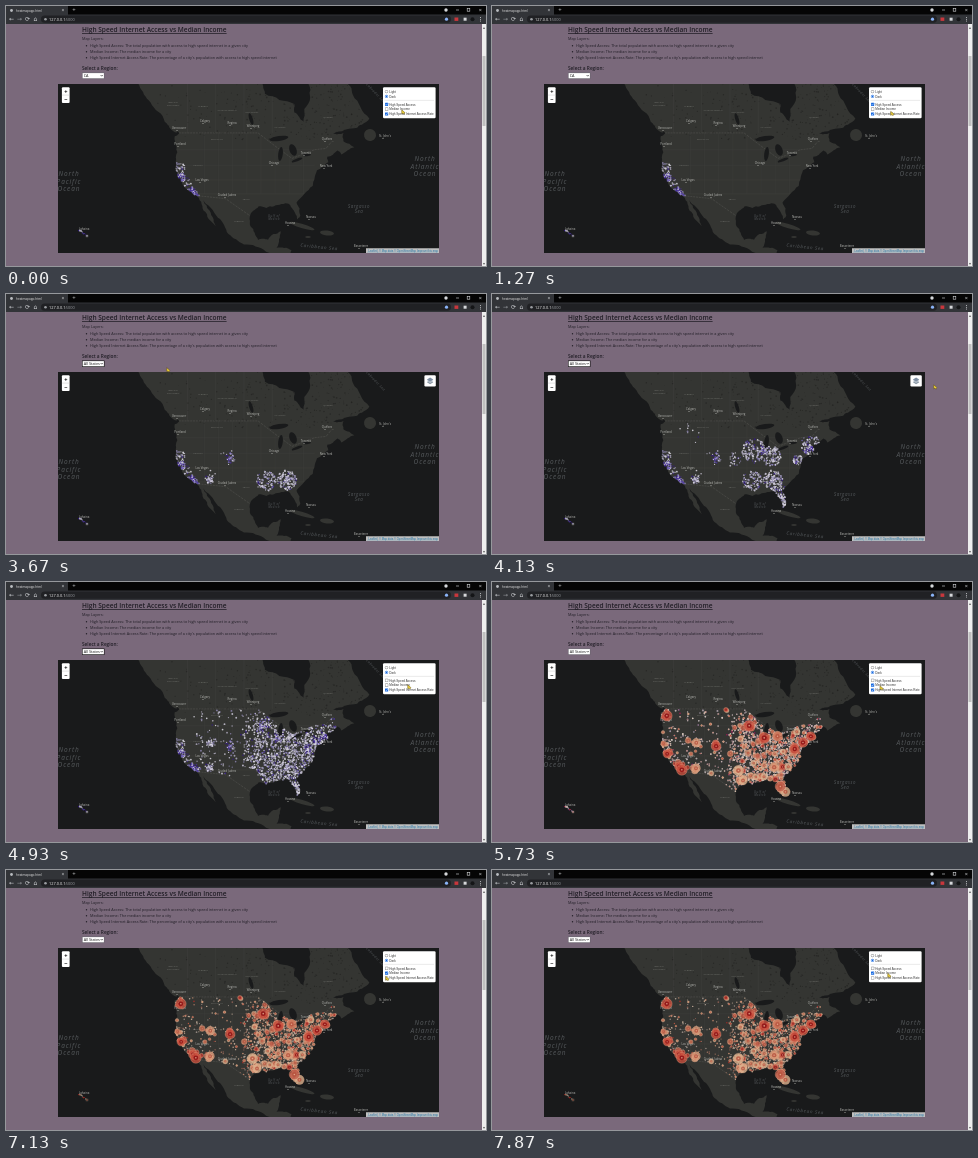
An HTML page with a canvas for the animation above (8000 ms loop, 480 by 260 pixels).

```html
<!DOCTYPE html>
<html lang="en">
<head>
<meta charset="utf-8">
<title>High Speed Internet Access</title>
<style>
html, body { margin: 0; width: 100%; height: 100%; overflow: hidden; background: #7a697b; }
canvas { display: block; width: 480px; height: 260px; }
</style>
</head>
<body>
<canvas id="stage" width="480" height="260"></canvas>
<script>
const W = 480, H = 260, LOOP = 8000;
const SANS = '"Open Sans", "Noto Sans", sans-serif';
const ARIAL = '"Liberation Sans", Arial, sans-serif';
const SYMBOL = '"DejaVu Sans", sans-serif';
const stage = document.getElementById('stage').getContext('2d');

let seed = 20417;
function rand() {
  seed = (seed + 0x6D2B79F5) | 0;
  let z = Math.imul(seed ^ (seed >>> 15), 1 | seed);
  z = (z + Math.imul(z ^ (z >>> 7), 61 | z)) ^ z;
  return ((z ^ (z >>> 14)) >>> 0) / 4294967296;
}
const gauss = () => rand() + rand() + rand() - 1.5;
const pick = list => list[Math.floor(rand() * list.length)];
const clamp = (v, a = 0, b = 1) => Math.min(b, Math.max(a, v));

// Drawing helpers
function disc(c, x, y, r, fill) {
  c.fillStyle = fill;
  c.beginPath();
  c.arc(x, y, r, 0, 7);
  c.fill();
}
function box(c, x, y, w, h, fill, round = 0) {
  c.fillStyle = fill;
  c.beginPath();
  c.roundRect(x, y, w, h, round);
  c.fill();
}
function line(c, x1, y1, x2, y2, color, width) {
  c.strokeStyle = color;
  c.lineWidth = width;
  c.beginPath();
  c.moveTo(x1, y1);
  c.lineTo(x2, y2);
  c.stroke();
}
function text(c, s, x, y, font, color, align = 'left') {
  c.font = font;
  c.fillStyle = color;
  c.textAlign = align;
  c.fillText(s, x, y);
}
function layer(draw) {
  const el = document.createElement('canvas');
  el.width = W;
  el.height = H;
  draw(el.getContext('2d'));
  return el;
}
function clipMap(c) {
  c.beginPath();
  c.rect(52, 78, 381, 169);
  c.clip();
}

// Web Mercator
const merc = lat => Math.log(Math.tan(Math.PI / 4 + lat * Math.PI / 360)) * 180 / Math.PI;
const px = lon => 294 + (lon + 80.2) * 2.83;
const py = lat => 211.5 - (merc(lat) - 26.7) * 2.85;

// Closed outline, roughened by midpoint displacement
function ragged(coords, rounds) {
  let pts = [];
  for (let i = 0; i < coords.length; i += 2) pts.push([px(coords[i]), py(coords[i + 1])]);
  while (rounds--) {
    pts = pts.flatMap(([x, y], i) => {
      const [u, v] = pts[(i + 1) % pts.length], k = (rand() - .5) * .24;
      return [[x, y], [(x + u) / 2 + (v - y) * k, (y + v) / 2 - (u - x) * k]];
    });
  }
  const p = new Path2D();
  for (const [x, y] of pts) p.lineTo(x, y);
  p.closePath();
  return p;
}
// Each blob: x, y, half width, half height, turn
function blobs(list) {
  const all = new Path2D();
  for (const b of list) {
    const p = new Path2D();
    p.ellipse(...b, 0, 7);
    all.addPath(p);
  }
  return all;
}

const mainland = ragged([-141,60, -137,58.8, -133,55.5, -128,51.5, -122.8,49, -124.5,48.2, -124.1,43,
  -124.2,40.4, -122.3,37, -120.6,34.6, -117.2,32.6, -114.3,28, -110,23, -112.8,28.5, -114.7,31.6,
  -109.2,25.7, -105.5,20.5, -100,17, -92.2,14.5, -84,12, -83.2,15, -88.5,15.9, -87,21.4, -91.5,18.6,
  -95,18.5, -97.7,23, -97.2,27.5, -94.8,29.3, -89.4,29.3, -84,30, -82.7,28.3, -81.2,25.2, -80.1,26.5,
  -81.4,30.5, -75.7,35.3, -74.2,39.7, -70.2,41.8, -70.6,43.2, -67,44.8, -65.5,43.8, -61,45.6,
  -64.8,47, -64.8,49, -68.5,48.8, -60,50.2, -55.7,52.2, -61.5,57, -64,60, -77.8,60, -76.6,56.5,
  -79,51.5, -82.2,53.5, -82.2,55.2, -92.6,57.2, -94.5,60], 3);
const islands = blobs([[364,129,6,6,.5], [167,123,5,1.5,.7], [296,220,13,2,.3], [321,227,7,2.4,.1],
  [302,231,2.8,1,0], [81,230,1.8,1.8,0]]);
const lakes = blobs([[273,132.5,9.5,2.5,-.15], [274.5,148,2.3,7,.12], [287,144,3.5,6,-.35],
  [291,154,5.6,1.4,-.35], [301,149,4,1.2,-.1], [245,113,1.8,6,-.3]]);

// Piecewise linear: alternating x, y keys
function trace(x, ...keys) {
  let i = 2;
  while (i < keys.length - 2 && keys[i] < x) i += 2;
  const u = clamp((x - keys[i - 2]) / (keys[i] - keys[i - 2]));
  return keys[i - 1] + (keys[i + 1] - keys[i - 1]) * u;
}
const northEdge = lon => trace(lon, -95, 49, -83, 42.8, -75, 45, -71, 45.3, -69, 47);
const southEdge = lon => trace(lon, -117, 32.5, -106.5, 31.6, -97.3, 26, -96, 24);
const inUsa = (lon, lat) => lat < northEdge(lon) && lat > southEdge(lon) && lon < -67.5
  && stage.isPointInPath(mainland, px(lon), py(lat)) && !stage.isPointInPath(lakes, px(lon), py(lat));
const inCalifornia = (lon, lat) => lat < 41.7 && lon < -120.8 + Math.max(0, 39 - lat) * .78;

// Regions in the order they load: x, y, radius
const early = [[281,186,10], [260,187,10], [207,183,8], [222,163,8], [319,151,10], [291,207,15],
  [197,140,11], [262,157,12], [279,162,10], [241,166,8], [306,166,5]];
const FIRST = early.length, ALL = FIRST + 20;
function loadOrder(lon, lat) {
  if (inCalifornia(lon, lat)) return 1;
  if (lon < -150) return 4;
  const i = early.findIndex(([x, y, r]) => Math.hypot(px(lon) - x, py(lat) - y) < r);
  if (i >= 0) return i;
  const texas = lat < 33.5 && lon > -104 && lon < -94, northwest = lon < -117;
  if (texas || northwest) return ALL - 1;
  return FIRST + 1 + Math.abs(Math.floor(lon / 4) * 7 + Math.floor(lat / 3) * 5) % 14;
}

const whites = ['#e9e6f0', '#d3cfe0', '#b5b0c6', '#9088b4'];
const purples = ['#7a6cc0', '#4b35a0', '#33198a', '#d9d4ec'];
const tans = ['#c9b8aa', '#d9b79b', '#a89a92', '#cf8f72', '#e2c6ae', '#9b6558'];
const reds = ['#e0a080', '#cf5f47', '#b52a24', '#e8c3a5'];
const dots = [], circles = [];

function addDot(lon, lat, rich) {
  const near = rich && rand() < .75;
  dots.push({
    x: px(lon), y: py(lat), ca: inCalifornia(lon, lat), order: loadOrder(lon, lat),
    blue: pick(near ? purples : whites), red: pick(near ? reds : tans), r: .5 + rand() * .38
  });
}
function addCircle(lon, lat, r, rich) {
  circles.push({ x: px(lon), y: py(lat), r, ca: inCalifornia(lon, lat),
    fill: rich ? '#c9503e' : pick(['#d99a78', '#d07a5e', '#dcb08c', '#bf5b48']),
    core: rich ? '#8a0c12' : '#b5523f' });
}

// Scattered towns, thinning out westwards
for (let i = 0; i < 5200; i++) {
  const lon = -124.5 + rand() * 57, lat = 25 + rand() * 24;
  if (!inUsa(lon, lat)) continue;
  const east = clamp((lon + 101) / 6);
  const chance = inCalifornia(lon, lat) ? .6 : .09 + .85 * east * clamp((50 - lat) / 6);
  if (rand() > chance) continue;
  addDot(lon, lat, rand() < .2);
  if (rand() < .15) addCircle(lon, lat, .9 + 2.6 * rand() ** 3, rand() < .15);
}
// Big cities: the first ones are the richer
const hubs = [[-122.2,37.6], [-118,34], [-117,33], [-122.3,47.4], [-104.9,39.7], [-87.9,41.9], [-93.2,45],
  [-74.2,40.7], [-77.1,38.9], [-71.4,42.3], [-112,33.5], [-97,32.8], [-95.4,29.8], [-84.4,33.8],
  [-82.2,28], [-80.4,26.3], [-83.2,42.3], [-111.9,40.6]];
hubs.forEach(([lon, lat], i) => {
  const rich = i < 10;
  for (let k = 0; k < 34; k++) {
    const a = lon + gauss() * 1.5, b = lat + gauss() * 1.1;
    if (inUsa(a, b)) addDot(a, b, rich);
  }
  for (let k = 0; k < 3; k++) addCircle(lon + gauss() * 1.6, lat + gauss(), 1.4 + rand() * 1.8, rich);
  addCircle(lon, lat, 4.2 + rand() * 1.4, rich);
});
for (let i = 0; i < 8; i++) addDot(-158.4 + i * .42, 21.7 - i * .27 + gauss() * .3, true);
circles.sort((a, b) => a.r - b.r);

function drawBlue(c, keep) {
  c.globalAlpha = .8;
  for (const d of dots) if (keep(d)) disc(c, d.x, d.y, d.r + .1, d.blue);
  c.globalAlpha = 1;
}
function drawRed(c, keep) {
  c.globalAlpha = .8;
  for (const d of dots) if (keep(d)) disc(c, d.x, d.y, d.r, d.red);
  for (const o of circles.filter(keep)) {
    disc(c, o.x, o.y, o.r, o.fill);
    c.strokeStyle = '#e9b595';
    c.lineWidth = .35;
    c.stroke();
    disc(c, o.x, o.y, o.r * .45, o.core);
    disc(c, o.x, o.y, o.r * .15, '#e9b595');
  }
  c.globalAlpha = 1;
}

function drawChrome(c) {
  const pale = '#d5d7da', dim = '#9a9da1';
  box(c, 0, 0, W, 9, '#050505');
  box(c, 0, 0, 62, 9, '#323438');
  box(c, 0, 8.5, W, 9.5, '#323438');
  box(c, 35, 9.6, 410, 7.2, '#202124', 3.6);
  disc(c, 5.5, 4.5, 1.4, '#b9bcc0');
  text(c, 'heatmapapp.html', 10, 5.7, '3.1px ' + SANS, '#e4e4e4');
  text(c, '×', 57, 6, '5px ' + SANS, pale, 'center');
  text(c, '+', 68, 6.2, '6px ' + SANS, pale, 'center');
  text(c, '←', 5.5, 15, '6px ' + SYMBOL, pale, 'center');
  text(c, '→', 13.5, 15, '6px ' + SYMBOL, dim, 'center');
  text(c, '⟳', 21.5, 15, '6px ' + SYMBOL, pale, 'center');
  text(c, '⌂', 29.5, 15, '6px ' + SYMBOL, pale, 'center');
  disc(c, 39.5, 13.2, 1.3, dim);
  text(c, '127.0.0.1', 43, 14.6, '3.9px ' + SANS, '#f1f1f1');
  text(c, ':5000', 58.8, 14.6, '3.9px ' + SANS, dim);
  disc(c, 440.5, 13.2, 1.6, '#8ab4f8');
  box(c, 448.5, 11.5, 3.8, 3.4, '#c9373c');
  box(c, 457.6, 11.7, 3, 3, pale);
  disc(c, 466.5, 13.2, 2, '#141517');
  for (let i = -1; i < 2; i++) disc(c, 474.5, 13.2 + i * 1.7, .5, pale);
  disc(c, 440, 4, 1.7, pale);
  line(c, 450, 4, 453, 4, pale, .6);
  c.strokeRect(461.2, 2.6, 2.6, 2.6);
  text(c, '×', 474.2, 5.9, '5.5px ' + SANS, pale, 'center');
}

function drawPage(c) {
  const ink = '#211e26', body = '3.83px ' + SANS;
  box(c, 0, 18, W, H - 18, '#7a697b');
  box(c, 476, 18, 4, H - 18, '#eeeeee');
  box(c, 476.5, 50, 3, 70, '#bfbfbf');
  text(c, '▴', 478, 22.5, '4px ' + SYMBOL, '#555', 'center');
  text(c, '▾', 478, 258.5, '4px ' + SYMBOL, '#555', 'center');
  const title = 'High Speed Internet Access vs Median Income';
  text(c, title, 76, 26.3, '600 6.55px ' + SANS, ink);
  box(c, 76, 27.1, c.measureText(title).width, .6, ink);
  text(c, 'Map Layers:', 76, 34.3, body, ink);
  ['High Speed Access: The total population with access to high speed internet in a given city',
    'Median Income: The median income for a city',
    "High Speed Internet Access Rate: The percentage of a city's population with access to high speed internet"
  ].forEach((s, i) => {
    disc(c, 80.5, 39.8 + i * 6, .7, ink);
    text(c, s, 84, 41.1 + i * 6, body, ink);
  });
  text(c, 'Select a Region:', 76, 63.6, '600 4.75px ' + SANS, ink);
}

function drawLand(c) {
  box(c, 52, 78, 381, 169, '#191a1b');
  c.fillStyle = '#343532';
  c.fill(mainland);
  c.fill(islands);
  c.save();
  c.clip(mainland);
  // Small northern lakes
  c.globalAlpha = .6;
  for (let i = 0; i < 420; i++) {
    const x = 150 + rand() * 210, y = 78 + rand() * 56;
    if (rand() < (x - 110) / 200) disc(c, x, y, .3 + rand() * .6, '#20211f');
  }
  c.globalAlpha = 1;
  // Province and state lines
  for (let lon = -120; lon < -88; lon += 10) line(c, px(lon), py(60), px(lon), py(49), '#454642', .4);
  for (let lat = 33; lat < 49; lat += 4) line(c, px(-124), py(lat), px(-75), py(lat), '#40413d', .4);
  for (let lon = -114; lon < -78; lon += 5) line(c, px(lon), py(northEdge(lon)), px(lon), py(33), '#40413d', .4);
  for (const edge of [northEdge, southEdge]) {
    for (let lon = -123; lon < -68; lon++)
      line(c, px(lon), py(edge(lon)), px(lon + .7), py(edge(lon + .7)), '#565753', .5);
  }
  c.restore();
  c.fillStyle = '#191a1b';
  c.fill(lakes);
}

function seaText(c, s, x, y, size, turn = 0) {
  c.save();
  c.translate(x, y);
  c.rotate(turn);
  c.letterSpacing = size * .14 + 'px';
  s.split('|').forEach((part, i) => text(c, part, 0, i * size * 1.16, `italic ${size}px ${SANS}`, '#565a5d', 'center'));
  c.restore();
}

function drawLabels(c) {
  for (const [s, x, y] of [['BRITISH', 167, 97], ['COLUMBIA', 167, 100], ['ALBERTA', 197, 101],
    ['SASKATCHEWAN', 221, 105], ['MANITOBA', 246, 107], ['ONTARIO', 274, 122], ['QUEBEC', 322, 112],
    ['MONTANA', 211, 134], ['NEVADA', 192, 160], ['TEXAS', 240, 194], ['MEXICO', 233, 216]])
    text(c, s, x, y, '2.5px ' + SANS, '#747570', 'center');
  for (const [s, x, y] of [['Vancouver', 173, 123], ['Calgary', 199, 116], ['Regina', 226, 118],
    ['Winnipeg', 247, 121], ['Portland', 174, 139], ['Las Vegas', 196, 175], ['Ciudad Juárez', 221, 190],
    ['Chicago', 268, 158], ['Toronto', 300, 148], ['Québec', 321, 134], ['New York', 320, 161],
    ["St. John's", 379, 131], ['Havana', 284, 218], ['Nassau', 305, 212], ['Lahaina', 78, 224],
    ['Basseterre', 355, 241]]) {
    text(c, s, x, y, '2.9px ' + SANS, '#b5b6b2', 'center');
    disc(c, x - 2, y + 1.5, .5, '#c4c4c0');
  }
  seaText(c, 'North|Pacific|Ocean', 63, 170.3, 6.5);
  seaText(c, 'North|Atlantic|Ocean', 419, 155.3, 6.5);
  seaText(c, 'Sargasso|Sea', 353, 201.7, 4.4);
  seaText(c, 'Gulf of|Mexico', 268, 211, 3);
  seaText(c, 'Labrador Sea', 369, 88, 3.4, .8);
  seaText(c, 'Caribbean Sea', 313, 242.5, 4.6, .1);
}

function drawMap(c) {
  c.save();
  clipMap(c);
  drawLand(c);
  drawLabels(c);
  c.restore();
  box(c, 360, 242.3, 73, 4.7, 'rgba(255,255,255,.72)');
  text(c, 'Leaflet | © Map data © OpenStreetMap Improve this map', 432, 245.6, '2.75px ' + ARIAL, '#2878a8', 'right');
  line(c, 361, 246.2, 432, 246.2, '#5d96b8', .3);
  box(c, 55.9, 81.2, 7.7, 15.8, '#fff', 1);
  line(c, 55.9, 89.1, 63.6, 89.1, '#bbb', .4);
  text(c, '+', 59.8, 87.2, 'bold 5.5px ' + ARIAL, '#111', 'center');
  text(c, '−', 59.8, 94.9, 'bold 5.5px ' + ARIAL, '#111', 'center');
}

function drawSelect(c, all, focus) {
  box(c, 76, 66.5, 22.5, 6.4, focus ? '#101010' : '#6b6670');
  box(c, 76.6, 67.1, 21.3, 5.2, '#fff');
  text(c, all ? 'All States' : 'CA', 77.7, 71.1, '3.8px ' + SANS, '#111');
  line(c, 94.6, 69, 95.7, 70.2, '#111', .6);
  line(c, 95.7, 70.2, 96.8, 69, '#111', .6);
}

function drawToggle(c) {
  box(c, 418.4, 81.2, 11.4, 11.2, '#fff', 1.2);
  ['#8b98a5', '#b4bec8', '#7f8fa3'].forEach((fill, i) => {
    const y = 88.2 - i * 1.3;
    c.fillStyle = fill;
    c.beginPath();
    c.moveTo(420.9, y);
    c.lineTo(424.1, y - 2);
    c.lineTo(427.3, y);
    c.lineTo(424.1, y + 2);
    c.fill();
  });
}

function drawPane(c, checks) {
  const font = '3px ' + ARIAL, accent = '#1769e0';
  box(c, 377, 81.3, 52.6, 30.9, '#fff', 1.2);
  ['Light', 'Dark'].forEach((s, i) => {
    const y = 85.6 + i * 4.8;
    disc(c, 380.5, y, 1.6, i ? accent : '#777');
    disc(c, 380.5, y, 1.2, '#fff');
    if (i) disc(c, 380.5, y, .8, accent);
    text(c, s, 383.3, y + 1.1, font, '#333');
  });
  line(c, 378.5, 94.4, 428, 94.4, '#ccc', .4);
  ['High Speed Access', 'Median Income', 'High Speed Internet Access Rate'].forEach((s, i) => {
    const y = 98.4 + i * 4.8;
    box(c, 379, y - 1.6, 3.2, 3.2, checks[i] ? accent : '#777', .4);
    if (checks[i]) {
      line(c, 379.7, y, 380.4, y + .8, '#fff', .5);
      line(c, 380.4, y + .8, 381.6, y - .8, '#fff', .5);
    } else box(c, 379.4, y - 1.2, 2.4, 2.4, '#fff');
    text(c, s, 383.3, y + 1.1, font, '#333');
  });
}

function drawCursor(c, x, y) {
  c.beginPath();
  c.moveTo(x - 1.3, y - 2.2);
  c.lineTo(x - 1.3, y + 1.9);
  c.lineTo(x, y + 1.1);
  c.lineTo(x + .9, y + 2.3);
  c.lineTo(x + 1.9, y + .6);
  c.closePath();
  c.fillStyle = '#ecd03a';
  c.fill();
  c.strokeStyle = '#4a3c08';
  c.lineWidth = .4;
  c.stroke();
}

// Pointer moves: start, end, x, y
const moves = [[270,600,364,92], [800,1000,423,94], [1130,1270,400,107.5], [1270,1470,381,99],
  [1730,2000,381,108], [2000,2530,95,81], [2600,3130,82,71], [3470,4130,443,93], [4330,4930,403,105],
  [4930,5130,381,104], [5530,6000,402,109], [6870,7070,381,108.5], [7330,7600,397,105.5]];
function pointer(t) {
  let x = 397, y = 106;
  for (const [from, to, u, v] of moves) {
    const k = clamp((t - from) / (to - from)), e = k * k * (3 - 2 * k);
    x += (u - x) * e;
    y += (v - y) * e;
  }
  return [x, y];
}

const base = layer(c => { drawChrome(c); drawPage(c); drawMap(c); });
const mapLayer = (draw, keep) => layer(c => { clipMap(c); draw(c, keep); });
const blueCa = mapLayer(drawBlue, d => d.ca);
const redCa = mapLayer(drawRed, d => d.ca);
const blueAll = mapLayer(drawBlue, () => true);
const redAll = mapLayer(drawRed, () => true);

const SWITCH = 3470, LOADED = 5100;
function drawDots(c, t, median, rate) {
  if (t < SWITCH) {
    c.drawImage(median ? redCa : blueCa, 0, 0);
  } else if (t < LOADED) {
    const n = trace(t, SWITCH, 0, 4100, FIRST, 4330, FIRST, 4850, ALL - 2, LOADED, ALL);
    drawBlue(c, d => d.order < n);
  } else {
    if (rate) c.drawImage(blueAll, 0, 0);
    if (median) c.drawImage(redAll, 0, 0);
  }
}

function frame(t) {
  const c = stage, all = t >= SWITCH, [x, y] = pointer(t);
  const access = t < 1730;
  const median = all ? t >= 5200 : t >= 1870;
  const rate = all ? t < 7130 : t < 2000;
  c.drawImage(base, 0, 0);
  drawSelect(c, all, all && t < 5200);
  drawDots(c, t, median, rate);
  if (x > 377 && x < 430 && y > 81 && y < 112) drawPane(c, [access, median, rate]);
  else drawToggle(c);
  drawCursor(c, x, y);
}

const start = performance.now();
function tick() {
  frame((performance.now() - start) % LOOP);
  requestAnimationFrame(tick);
}
tick();
</script>
</body>
</html>
```
